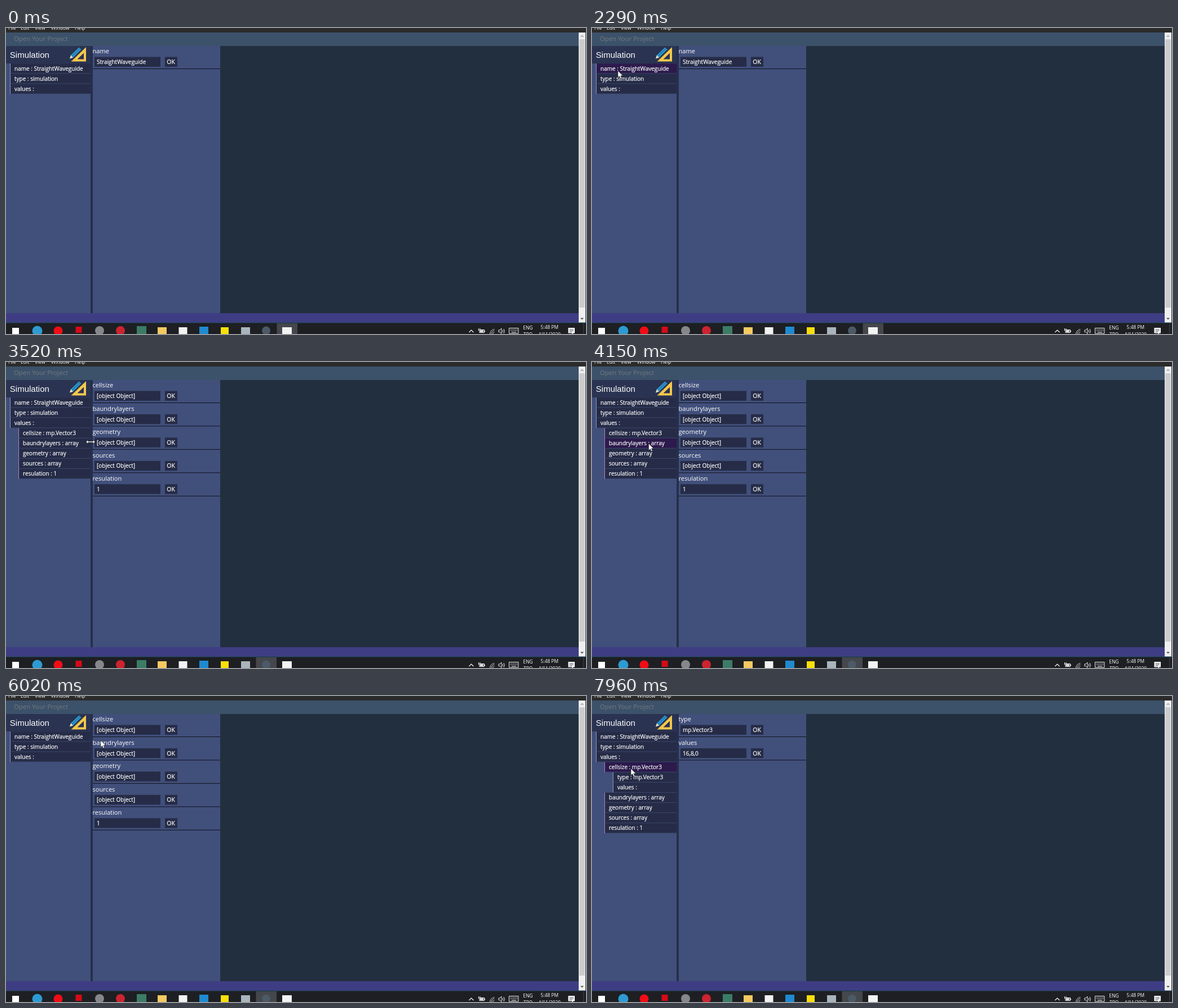
These frames come from a looping animation (1029x544 px, 8000 ms). An HTML page:

```html
<!DOCTYPE html>
<html lang="en">
<head>
<meta charset="utf-8">
<title>Simulation editor</title>
<style>
  html, body { margin: 0; width: 100%; height: 100%; overflow: hidden; background: #222f3e; }
  svg { display: block; width: 100vw; height: 100vh; }
  text { font-family: "Open Sans", "Noto Sans", sans-serif; fill: #fff; white-space: pre; }
  .row { font-size: 10px; stroke: #fff; stroke-width: .2px; }
  .label { font-size: 11.1px; }
  .menu { font-size: 8.6px; }
  .tray { font-size: 8.4px; }
  .title { font: 15px "Liberation Sans", Arial, sans-serif; }
  .project { font-size: 11.35px; fill: #75797d; }
</style>
</head>
<body>
<svg viewBox="0 0 1029 544" preserveAspectRatio="none">
  <g id="chrome"></g>
  <g id="tree"></g>
  <g id="panel"></g>
  <g id="taskbar"></g>
  <circle id="click" r="9" fill="#ff0" fill-opacity=".47"/>
  <path id="arrow" d="M0 0V12.2L2.8 9.6 4.7 13.9 6.8 13 5 8.8H8.8Z" fill="#fff" stroke="#111" stroke-width=".6"/>
  <path id="resize" d="M-8 0L-4.5 -3.5V-1H4.5V-3.5L8 0 4.5 3.5V1H-4.5V3.5Z" fill="#fff" stroke="#111" stroke-width=".6"/>
</svg>
<script>
const LOOP = 8000, ROW_TOP = 63.2, ROW_H = 18.1, BLOCK_H = 41.45;
const $ = id => document.getElementById(id);
const rect = (x, y, w, h, fill) => `<rect x="${x}" y="${y}" width="${w}" height="${h}" fill="${fill}"/>`;
const disc = (x, y, r, fill) => `<circle cx="${x}" cy="${y}" r="${r}" fill="${fill}"/>`;
const text = (x, y, cls, s, extra = '') => `<text x="${x}" y="${y}" class="${cls}" ${extra}>${s}</text>`;
const line = (d, color = '#fff', w = 1) => `<path d="${d}" fill="none" stroke="${color}" stroke-width="${w}"/>`;
const shape = (d, fill) => `<path d="${d}" fill="${fill}" fill-rule="evenodd"/>`;

// Cursor moves: start, end, number of steps, then [step, x, y] keys.
const moves = [
  [210, 750, 8, [[1, 978, 534], [4, 740, 420], [7, 545, 335], [8, 567, 342]]],
  [980, 1750, 11, [[5, 300, 230], [9, 100, 80], [11, 70, 94]]],
  [1830, 2060, 4, [[4, 50, 74]]],
  [2210, 2520, 5, [[2, 46, 76], [4, 55, 108], [5, 55, 108]]],
  [2670, 2980, 5, [[1, 55, 108], [5, 98, 106]]],
  [3290, 3820, 8, [[1, 118, 122], [4, 150, 142], [8, 100, 188]]],
  [3990, 4380, 6, [[6, 101, 102]]],
  [5540, 6310, 11, [[1, 106, 103], [7, 168, 79], [9, 180, 33], [11, 190, 62]]],
  [6390, 7080, 10, [[4, 120, 130], [10, 58, 112]]],
  [7490, 7570, 2, [[2, 69, 129]]]
];
const clicks = [[2520, 2670], [4690, 4840], [7250, 7320], [7790, 7960]];

function cursorAt(t) {
  let pos = [990, 570];
  for (const [start, end, steps, keys] of moves) {
    if (t < start) break;
    const step = 1 + Math.min(steps - 1, Math.floor((t - start) / (end - start) * (steps - 1) + 1e-6));
    let from = [0, ...pos];
    for (const key of keys) {
      const u = Math.min(1, (step - from[0]) / (key[0] - from[0]));
      pos = [1, 2].map(i => from[i] + (key[i] - from[i]) * u);
      if (step <= key[0]) break;
      from = key;
    }
  }
  return pos;
}

function rowsAt(t) {
  const open = (t >= 2670 && t < 4840) || t >= 7320;
  const rows = [[0, 'name : StraightWaveguide'], [0, 'type : simulation'], [0, 'values :']];
  if (open) rows.push([1, 'cellsize : mp.Vector3']);
  if (t >= 7960) rows.push([2, 'type : mp.Vector3'], [2, 'values :']);
  if (open) rows.push([1, 'baundrylayers : array'], [1, 'geometry : array'], [1, 'sources : array'], [1, 'resulation : 1']);
  return rows;
}

function fieldsAt(t) {
  if (t < 2670) return [['name', 'StraightWaveguide']];
  if (t >= 7960) return [['type', 'mp.Vector3'], ['values', '16,8,0']];
  return [...['cellsize', 'baundrylayers', 'geometry', 'sources'].map(n => [n, '[object Object]']), ['resulation', '1']];
}

function drawTree(rows, [cx, cy]) {
  const edges = ['#8f9abb', '#b184bd', '#8f9abb'];
  return rows.map(([depth, label], i) => {
    const x = 7 + depth * 15, y = ROW_TOP + i * ROW_H;
    const hover = cx >= x && cx < 149 && cy >= y && cy < y + ROW_H;
    return rect(x, y, 150 - x, ROW_H, '#3d4a6e')
      + rect(x, y, 150 - x, ROW_H - .9, hover ? '#2c1a4c' : '#262c47')
      + rect(x, y, 1, ROW_H, edges[depth])
      + text(x + 8, y + 12.3, 'row', label);
  }).join('');
}

const drawPanel = fields => fields.map(([name, value], i) => {
  const y = 31.5 + i * BLOCK_H;
  return text(153.5, y + 13.8, 'label', name)
    + rect(157, y + 20, 117, 17.3, '#262c47') + text(161, y + 32.6, 'row', value)
    + rect(282, y + 20, 22, 17.3, '#262c47') + text(285.3, y + 32.6, 'row', 'OK', 'style="font-size:10.4px"')
    + rect(154, y + 40.5, 226, 1, '#10131d');
}).join('');

function drawChrome() {
  const menu = [[4, 'File'], [26, 'Edit'], [51, 'View'], [80, 'Window'], [122, 'Help']];
  return rect(0, 0, 1029, 544, '#222f3e')
    + rect(0, 0, 1029, 8, '#2b2b2b') + menu.map(([x, s]) => text(x, 3.3, 'menu', s)).join('')
    + rect(0, 8, 1016, 24, '#3c526a') + text(14, 22.8, 'project', 'Open Your Project')
    + rect(0, 32, 150, 475, '#414f7b') + rect(150, 32, 4, 475, '#262f4b')
    + rect(154, 32, 226, 475, '#414f7b') + rect(0, 32, 150, 31, '#2a3351')
    + text(6.8, 52.5, 'title', 'Simulation')
    + shape('M142 34V59.5H115.5ZM138 44.5L126.5 55.5H138Z', '#f5c84c')
    + line('M119 58l-1.5-1.5M123 54l-1.5-1.5M127 50l-1.5-1.5M131 46l-1.5-1.5M135 42l-1.5-1.5', '#8d6a20', .8)
    + shape('M113 54.5L115 48.5 129.5 34.5 133.5 38 119 52.5Z', '#2b9bd6')
    + shape('M113 54.5L115 48.5 119 52.5Z', '#f0dfc0')
    + line('M117 50.5L131.5 36.2', '#14506f', 1)
    + rect(0, 507, 1016, 17, '#3e3d83')
    + rect(1016, 8, 12, 516, '#f0f0f0') + rect(1017, 20, 10, 477, '#cdcdcd')
    + line('M1019.5 16l2.5-2.5 2.5 2.5', '#a0a0a0', 1.3) + shape('M1019 515.5h6l-3 3Z', '#505050');
}

function drawTaskbar(active) {
  const tile = (cx, w, fill, y = 530) => rect(cx - w / 2, y, w, w, fill);
  return rect(0, 524, 1029, 20, '#1d1f23') + rect(0, 523.5, 1029, 1, '#235069')
    + rect(active, 525, 36.5, 19, '#44474c')
    + tile(17, 12, '#fff', 533)
    + disc(55.5, 538.5, 9, '#2d9bd2') + disc(92.5, 538.5, 8, '#f00d16')
    + tile(129, 11, '#d50b17', 531) + disc(166, 538, 8, '#85878a')
    + disc(203, 538, 8, '#cc2430') + tile(240.5, 17, '#3c7c67')
    + tile(277, 16, '#f5ca62', 532) + tile(314, 15, '#f2f2f2', 532)
    + tile(351, 16, '#1f8ad0', 531) + tile(388, 14, '#fbdf0c', 532)
    + tile(425, 16, '#aab4bd', 532) + disc(461.5, 538, 7.5, '#4c5966')
    + tile(498.5, 17, '#f3f3f3', 532)
    + line('M821.5 541l4-4 4 4', '#fff', 1.1)
    + line('M840 536.5h8.5v5H840ZM849.5 538v2M838.5 534v4M841 534v3', '#fff', 1)
    + rect(841, 537.5, 6, 3, '#fff')
    + line('M858.5 544a9 9 0 0 1 8-8.5M861 544a6 6 0 0 1 5.5-6M863.5 544a3 3 0 0 1 3-3', '#ddd', .9)
    + line('M874 537h2l3-3v9.5l-3-3h-2ZM881 537q1.5 2 0 4M883 535q3 4 0 8', '#fff', .9)
    + line('M892.5 533.5h16.5v9.5h-16.5Z', '#fff', .9)
    + line('M894.5 536h13M894.5 538.3h13', '#fff', .9).replace('/>', ' stroke-dasharray="1.3 1"/>')
    + line('M897 541h8', '#fff', .9)
    + text(917.5, 535.6, 'tray', 'ENG') + text(918, 548, 'tray', 'TRQ')
    + text(964.3, 535.4, 'tray', '5:48 PM', 'text-anchor="middle"')
    + text(964.3, 548, 'tray', '4/11/2020', 'text-anchor="middle"')
    + shape('M997.5 533h11.5v9.5h-3v2l-2.5-2h-6Z', '#fff')
    + line('M999.5 535.8h7.5M999.5 538h7.5M999.5 540.2h5', '#33363a', .8)
    + rect(1024.5, 525, .7, 19, '#55585c');
}

const painted = {};
function paint(id, markup) {
  if (painted[id] !== markup) $(id).innerHTML = painted[id] = markup;
}

function show(t) {
  const pos = cursorAt(t), [x, y] = pos;
  const resizing = x >= 149 && x <= 155 && y > 32 && y < 507;
  paint('tree', drawTree(rowsAt(t), pos));
  paint('panel', drawPanel(fieldsAt(t)));
  paint('taskbar', drawTaskbar(t < 2670 ? 480.5 : 443.5));
  const place = (id, on) => {
    $(id).setAttribute('transform', `translate(${x} ${y})`);
    $(id).setAttribute('visibility', on ? 'visible' : 'hidden');
  };
  place('click', clicks.some(([a, b]) => t >= a && t < b));
  place('arrow', !resizing);
  place('resize', resizing);
}

paint('chrome', drawChrome());
const began = performance.now();
function tick() {
  show((performance.now() - began) % LOOP);
  requestAnimationFrame(tick);
}
tick();
</script>
</body>
</html>
```
